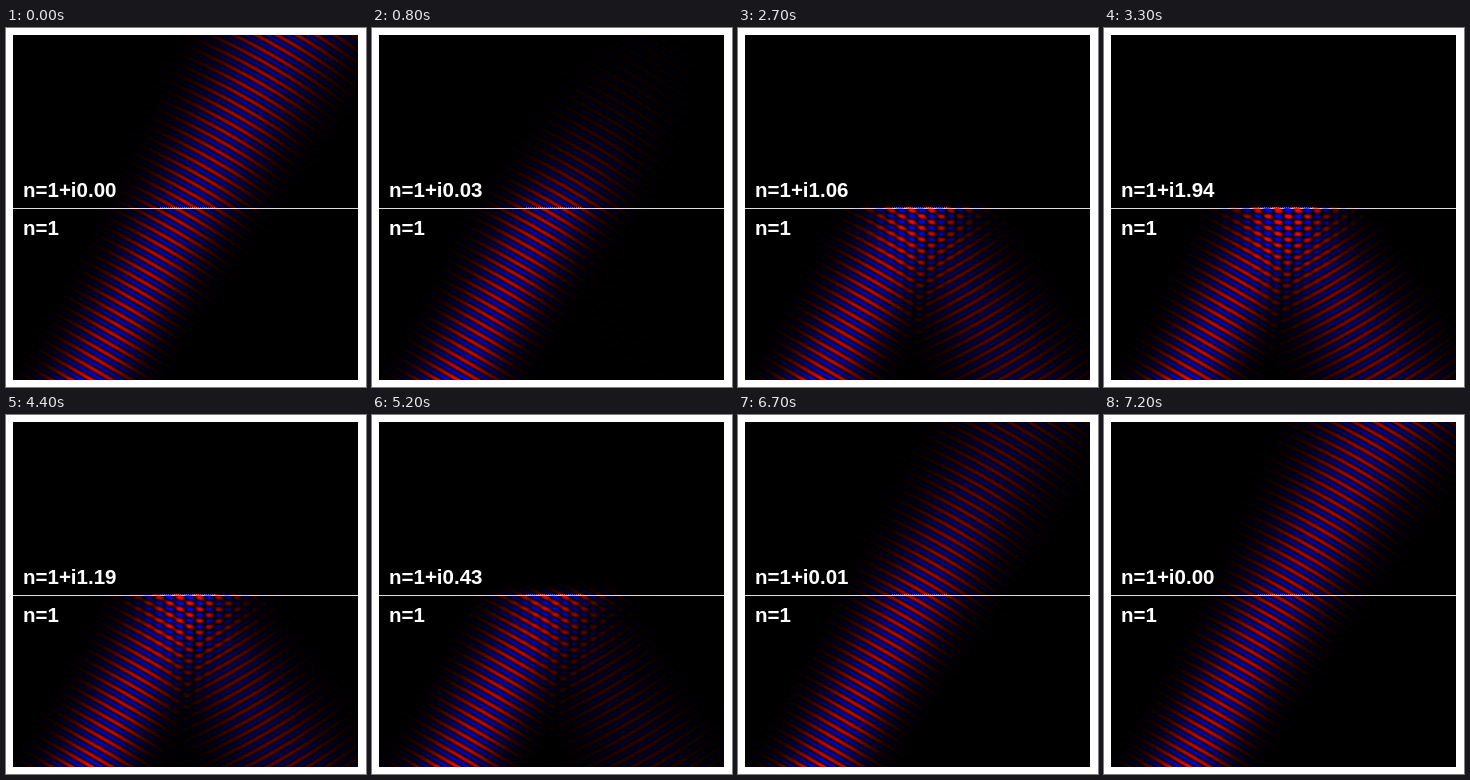
Recreate the animation shown at these times as an HTML page with a canvas. Size 360 by 359 pixels, loop 7300 ms.

```html
<!DOCTYPE html>
<html lang="en">
<head>
<meta charset="utf-8">
<title>Beam at an absorbing interface</title>
<style>
  html, body { margin: 0; width: 100%; height: 100%; overflow: hidden; background: #fff; }
  canvas { display: block; }
</style>
</head>
<body>
<canvas id="stage" width="360" height="359"></canvas>
<script>
const ctx = document.getElementById('stage').getContext('2d');
const LOOP = 7300, STEP = 100, PEAK = 33, HOLD_END = 4000;
const INSET = 7, SIZE = 345, EDGE = 173;
const WAVE = 2 * Math.PI / 10, SIN = 0.5, COS = Math.sqrt(0.75);
const WAIST = 33, RANGE = WAVE * WAIST * WAIST / 2;
const START = 199;   // path length from the waist to the interface

const re = new Float32Array(SIZE * SIZE);
const im = new Float32Array(SIZE * SIZE);
const image = ctx.createImageData(SIZE, SIZE);

// Incident Gaussian beam, phase zero at the centre of the interface.
function buildBeam() {
  const gouy = u => Math.atan(u / RANGE);
  for (let j = 0; j < SIZE; j++) {
    const up = EDGE - j;
    const glow = 1 + 0.35 * Math.exp((j - SIZE + 1) / 3);
    for (let i = 0; i < SIZE; i++) {
      const x = i - EDGE;
      const along = x * SIN + up * COS;
      const across = x * COS - up * SIN;
      const u = along + START;
      const spread = 1 + (u / RANGE) ** 2;
      const amp = 0.82 * glow * spread ** -0.25 *
        Math.exp(-across * across / (WAIST * WAIST * spread));
      const bend = across * across * u / (2 * (u * u + RANGE * RANGE));
      const phase = WAVE * (along + bend) - gouy(u) + gouy(START);
      re[j * SIZE + i] = amp * Math.cos(phase);
      im[j * SIZE + i] = amp * Math.sin(phase);
    }
  }
}

// Normal wave number in the medium and the reflection coefficient.
function optics(loss) {
  const a = 1 - loss * loss - SIN * SIN, b = 2 * loss;
  const kr = Math.sqrt((Math.hypot(a, b) + a) / 2), ki = b / (2 * kr);
  const den = (COS + kr) ** 2 + ki * ki;
  return {
    kr, ki,
    rr: ((COS - kr) * (COS + kr) - ki * ki) / den,
    ri: -2 * COS * ki / den
  };
}

function paintField(loss) {
  const { kr, ki, rr, ri } = optics(loss);
  const px = image.data;
  for (let j = 0; j < SIZE; j++) {
    const depth = EDGE - j;
    const inside = depth >= 0;
    const surface = depth === 0 || depth === 1;
    const d = surface ? 0 : depth;
    const decay = Math.exp(-WAVE * ki * d);
    const turn = WAVE * (kr - COS) * d;
    const c = decay * Math.cos(turn), s = decay * Math.sin(turn);
    const tr = (1 + rr) * c - ri * s, ti = (1 + rr) * s + ri * c;
    const gain = surface ? 1 + 0.5 * loss : 1;
    for (let i = 0; i < SIZE; i++) {
      const p = j * SIZE + i;
      let v;
      if (inside) {
        v = gain * (re[p] * tr - im[p] * ti);
      } else {
        const m = (2 * EDGE - j) * SIZE + i;
        v = re[p] + re[m] * rr - im[m] * ri;
      }
      let grey = 0;
      if (depth === 0) {
        grey = 220 * (1 - Math.min(1, Math.abs(v) * loss / 2));
      } else if (depth === 1 && i % 2 && Math.hypot(re[p], im[p]) > 0.5) {
        grey = 80;
      }
      const o = p * 4;
      px[o] = grey + 255 * Math.max(0, -v);
      px[o + 1] = grey;
      px[o + 2] = grey + 255 * Math.max(0, v);
      px[o + 3] = 255;
    }
  }
  ctx.putImageData(image, INSET, INSET);
}

function paint(k) {
  const loss = 5.4e-5 * k ** 3;
  ctx.fillStyle = '#fff';
  ctx.fillRect(0, 0, 360, 359);
  paintField(loss);
  ctx.font = 'bold 20.5px "Liberation Sans", Arial, sans-serif';
  ctx.fillText('n=1+i' + loss.toFixed(2), 17, 169);
  ctx.fillText('n=1', 17, 207);
}

function levelAt(t) {
  return t < HOLD_END
    ? Math.min(PEAK, Math.floor(t / STEP))
    : PEAK - 1 - Math.floor((t - HOLD_END) / STEP);
}

let shown = -1;
function tick() {
  const k = levelAt(performance.now() % LOOP);
  if (k !== shown) paint(shown = k);
  requestAnimationFrame(tick);
}

buildBeam();
tick();
</script>
</body>
</html>
```
